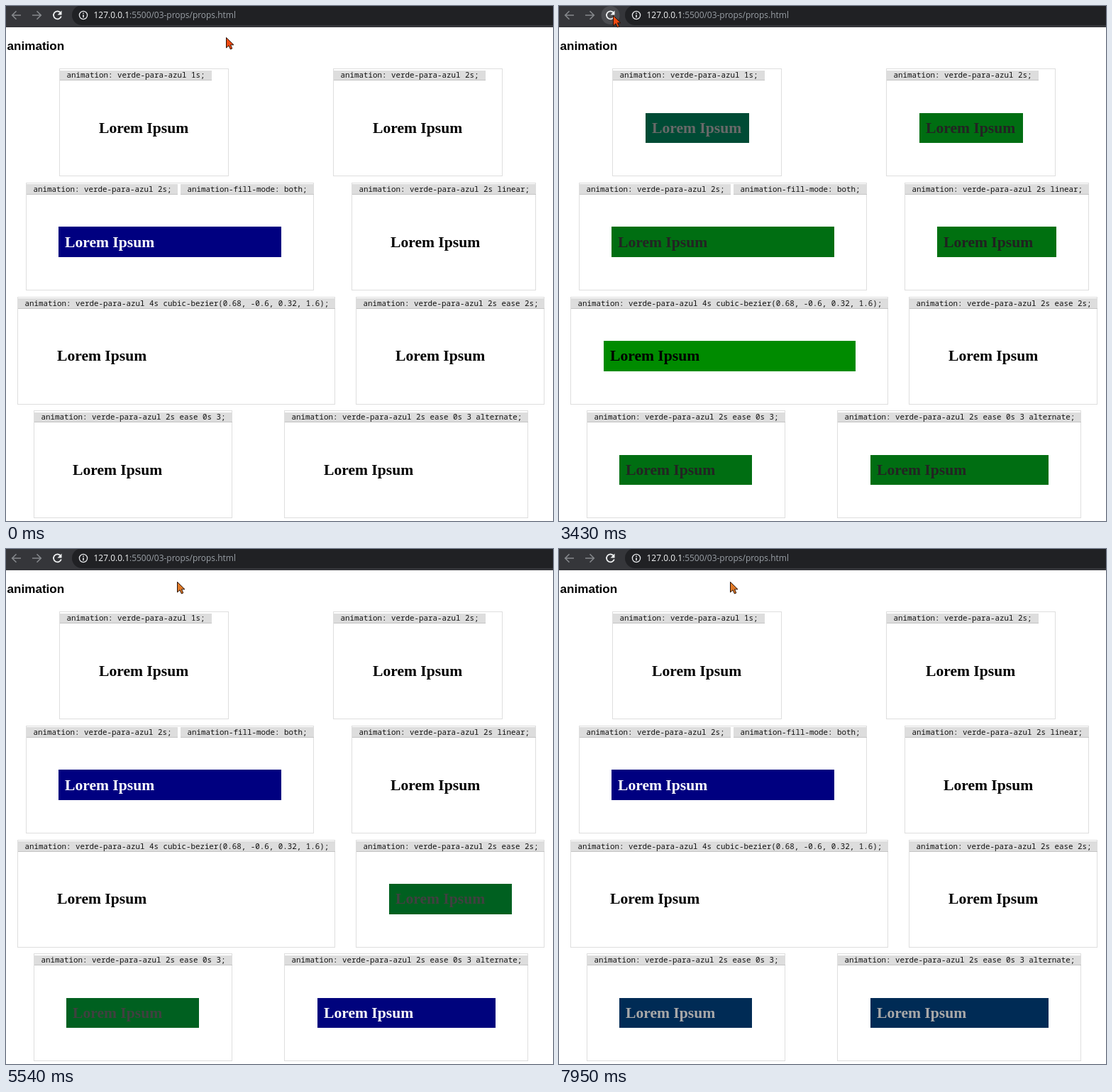
An HTML page for the animation above (8 s loop, 771x726 px).

```html
<!DOCTYPE html>
<html lang="pt">
<head>
<meta charset="utf-8">
<title>animation</title>
<style>
html, body { margin: 0; width: 100%; height: 100%; overflow: hidden; background: #fff; }
svg { display: block; width: 100%; height: 100%; }
text { white-space: pre; }
.url { font: 11.94px "Open Sans", "Noto Sans", sans-serif; fill: #9aa0a6; }
.title { font: bold 17.1px "Liberation Sans", Arial, sans-serif; }
.code { font: 10.83px "Noto Sans Mono", "DejaVu Sans Mono", monospace; fill: #111; }
.lorem { font: bold 21.6px "Liberation Serif", "Times New Roman", serif; }
.icon { fill: none; stroke-width: 1.6; }
</style>
</head>
<body>
<svg id="stage" viewBox="0 0 771 726">
  <rect width="771" height="726" fill="#fff"/>
  <rect width="771" height="30" fill="#35363a"/>
  <rect x="93" y="-1" width="700" height="28" rx="14" fill="#202124"/>
  <circle id="hover" cx="72.5" cy="13" r="13" fill="#4b4c50"/>
  <g class="icon" stroke="#85888c">
    <path d="M21 13H9M14.5 7.2L8.7 13l5.8 5.8"/>
    <path d="M37 13h12M43.5 7.2l5.8 5.8l-5.8 5.8"/>
  </g>
  <path class="icon" stroke="#f1f3f4" style="stroke-width:1.8" d="M76.6 9.2A5.5 5.5 0 1 0 77.8 14.5"/>
  <path fill="#f1f3f4" d="M78.5 6.5v6h-6z"/>
  <circle class="icon" cx="109" cy="13" r="5.6" stroke="#e8eaed" style="stroke-width:1.3"/>
  <path class="icon" stroke="#e8eaed" d="M109 9.6v1.5M109 12.3v4"/>
  <text class="url" x="123.5" y="17"><tspan fill="#f1f3f4">127.0.0.1</tspan>:5500/03-props/props.html</text>
  <text class="title" x="1.5" y="62">animation</text>
  <g id="cards"></g>
  <path id="cursor" d="M.5 .5V15L4 11.8L6.4 17L8.8 15.9L6.5 10.8H11z" stroke="#2a1206" stroke-linejoin="round"/>
</svg>
<script>
const LOOP = 8000, START = 3180, DUR = 2000;
const $ = id => document.getElementById(id);
const { round, floor } = Math;

function add(tag, attrs, text) {
  const el = document.createElementNS('http://www.w3.org/2000/svg', tag);
  for (const k in attrs) el.setAttribute(k, attrs[k]);
  if (text) el.textContent = text;
  return $('cards').appendChild(el);
}

// Rectangle with its edges snapped to whole pixels
function box(x1, y1, x2, y2, fill) {
  const x = round(x1), y = round(y1);
  return add('rect', { x, y, width: round(x2) - x, height: round(y2) - y, fill });
}

// CSS cubic-bezier timing, solved by bisection
function bezier(x1, y1, x2, y2) {
  const at = (a, b, s) => 3 * (1 - s) * (1 - s) * s * a + 3 * (1 - s) * s * s * b + s * s * s;
  return x => {
    let lo = 0, hi = 1;
    for (let i = 0; i < 30; i++) {
      const mid = (lo + hi) / 2;
      if (at(x1, x2, mid) < x) lo = mid; else hi = mid;
    }
    return at(y1, y2, lo);
  };
}

const ease = bezier(.25, .1, .25, 1);
const linear = x => x;
const back = bezier(.68, -.6, .32, 1.6);
const smooth = x => x * x * (3 - 2 * x);
const name = 'animation: verde-para-azul ';

const cards = [
  { row: 0, x: 75.5, r: 314, code: name + '1s;', w: 214, dur: 1000 },
  { row: 0, x: 461.5, r: 700, code: name + '2s;', w: 214 },
  { row: 1, x: 28, r: 434, code: name + '2s;', w: 213, extra: 'animation-fill-mode: both;', fill: true },
  { row: 1, x: 487, r: 747, code: name + '2s linear;', fn: linear },
  { row: 2, x: 16.5, r: 464, code: name + '4s cubic-bezier(0.68, -0.6, 0.32, 1.6);', fn: back },
  { row: 2, x: 493.5, r: 759, code: name + '2s ease 2s;', delay: 2000 },
  { row: 3, x: 39, r: 318.5, code: name + '2s ease 0s 3;', count: 3 },
  { row: 3, x: 392.5, r: 736, code: name + '2s ease 0s 3 alternate;', count: 3, alternate: true }
];

function label(x, top, w, text) {
  const bottom = round(top + 16.9);
  box(x, top + 2.4, x + w, bottom, '#ddd');
  box(x, bottom - 1, x + w, bottom, '#c4c4c4');
  add('text', { class: 'code', x: x + 9.5, y: round(top + 13) }, text);
}

for (const c of cards) {
  const top = 88.3 + 160.7 * c.row, x = floor(c.x), r = round(c.r);
  add('rect', {
    x: x + .5, y: round(top) + .5, width: r - x - 1, height: 151,
    fill: 'none', stroke: '#bdbdbd', 'stroke-dasharray': '1 1'
  });
  label(x + 1, top, c.w || r - x - 1, c.code);
  if (c.extra) label(246, top, 188, c.extra);
  c.bar = box(c.x + 46.3, top + 62.4, c.r - 46.2, top + 105);
  c.text = add('text', { class: 'lorem', x: round(c.x + 55.4), y: round(top + 90.7) }, 'Lorem Ipsum');
}

// Eased progress, or null while the animation has no effect
function progress(c, t) {
  if (t < START) return c.fill ? 1 : null;
  const n = (t - START - (c.delay || 0)) / (c.dur || DUR);
  if (n < 0) return null;
  if (n >= (c.count || 1)) return c.fill ? 1 : null;
  const turn = floor(n), p = n - turn;
  return (c.fn || ease)(c.alternate && turn % 2 ? 1 - p : p);
}

const channel = v => round(Math.max(0, Math.min(255, v)));

function paint(c, t) {
  const p = progress(c, t);
  if (p === null) {
    c.bar.setAttribute('fill', 'none');
    c.text.setAttribute('fill', '#000');
    return;
  }
  const grey = channel(255 * p);
  c.bar.setAttribute('fill', `rgb(0,${channel(128 * (1 - p))},${channel(128 * p)})`);
  c.text.setAttribute('fill', `rgb(${grey},${grey},${grey})`);
}

// time, x, y of the pointer
const path = [
  [0, 310, 44], [1030, 153, 44], [1900, 76, 13], [3480, 76, 13],
  [4300, 237, 46], [4700, 237, 46], [5100, 241, 46], [LOOP, 241, 46]
];

function pointer(t) {
  const i = Math.max(1, path.findIndex(k => k[0] > t));
  const [a, b] = [path[i - 1], path[i]];
  const p = smooth((t - a[0]) / (b[0] - a[0]));
  return [a[1] + (b[1] - a[1]) * p, a[2] + (b[2] - a[2]) * p];
}

function cursorColor(t) {
  if (t < 880 || (t >= 3100 && t < 3900)) return '#f04a12';
  return t < 3100 ? '#c96c12' : '#e07a28';
}

function draw(t) {
  cards.forEach(c => paint(c, t));
  const [x, y] = pointer(t).map(round);
  $('cursor').setAttribute('transform', `translate(${x} ${y})`);
  $('cursor').setAttribute('fill', cursorColor(t));
  $('hover').setAttribute('opacity', Math.hypot(x - 72.5, y - 13) < 14 ? 1 : 0);
}

const begin = performance.now();
function tick() {
  draw((performance.now() - begin) % LOOP);
  requestAnimationFrame(tick);
}
tick();
</script>
</body>
</html>
```
